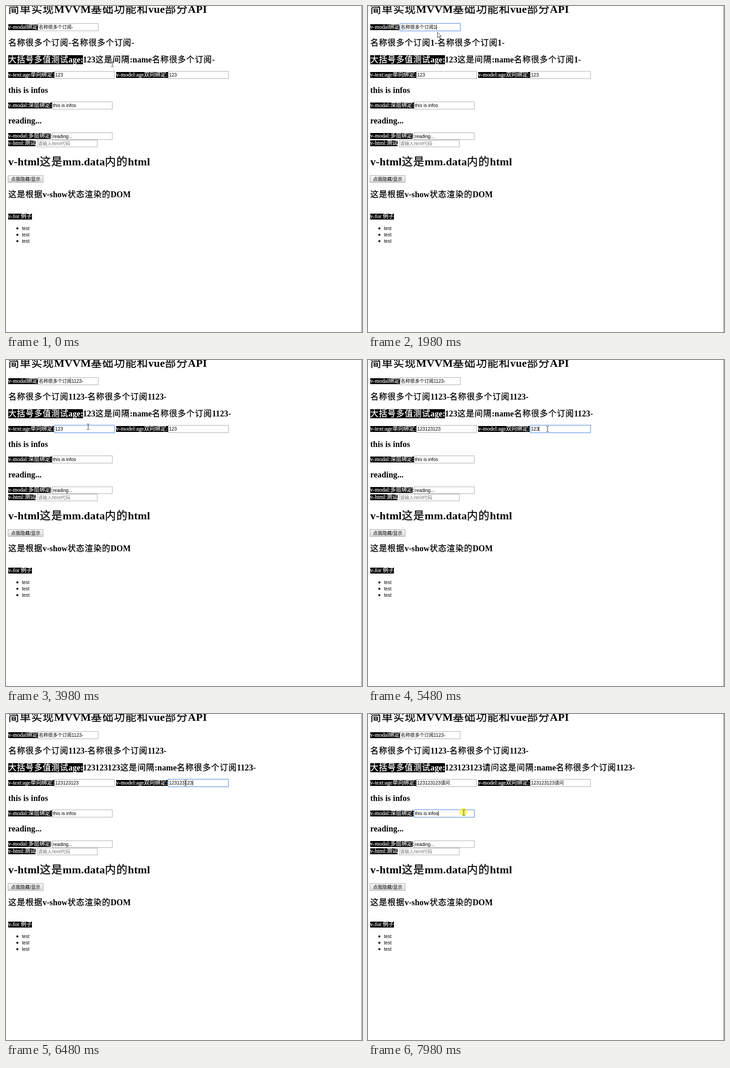
An HTML page that plays this animation: 782x716 px, repeating every 8000 ms.

```html
<!DOCTYPE html>
<html lang="zh-CN">
<head>
<meta charset="utf-8">
<style>
html, body { margin: 0; width: 100%; height: 100%; overflow: hidden; background: #fff; }
svg { display: block; }
text { white-space: pre; }
.h1, .h2 { font: bold 18px "Liberation Serif", serif; letter-spacing: .1px; }
.h1 { font-size: 24px; letter-spacing: .2px; }
.label { font: 12.2px "Liberation Serif", serif; stroke: currentColor; stroke-width: .2px; }
.ui { font: 10.3px "Liberation Sans", sans-serif; }
.ime { font: 13.3px "Noto Sans CJK SC", sans-serif; }
.num { font: 9.5px "Open Sans", sans-serif; }
.cjk { font-family: "Noto Sans CJK SC", sans-serif; font-weight: 400; }
.h1 .cjk, .h2 .cjk { letter-spacing: .05em; stroke: currentColor; stroke-width: .3px; }
.under { text-decoration: underline; }
</style>
</head>
<body>
<svg id="stage" width="782" height="716" viewBox="0 0 782 716"></svg>
<script>
const stage = document.getElementById('stage');

const start = {
  name: '', age: '123', oneWay: '123', twoWay: '123', compose: '',
  focus: '', caret: false, pointer: ['beam', 233, 127], click: false, ime: false
};

// Each step changes part of the state at its time in ms.
const steps = [
  [0, {}],
  [500, { pointer: ['beam', 146, 50] }],
  [980, { focus: 'name', caret: true }],
  [1480, { caret: false, pointer: ['arrow', 148, 61] }],
  [1980, { name: '1', caret: true, pointer: ['arrow', 152, 57] }],
  [2480, { name: '112' }],
  [2980, { name: '1123', pointer: ['beam', 213, 127] }],
  [3480, { focus: 'oneWay', pointer: ['beam', 180, 146], click: true }],
  [3980, { caret: false, click: false }],
  [4480, { oneWay: '1231231', caret: true }],
  [4980, { oneWay: '123123123', pointer: ['beam', 370, 151] }],
  [5480, { focus: 'twoWay', pointer: ['beam', 394, 151] }],
  [5980, { age: '123123', oneWay: '123123', twoWay: '123123' }],
  [6480, { age: '123123123', oneWay: '123123123', twoWay: '123123123' }],
  [6980, { age: "123123123q'we", oneWay: "123123123q'we", compose: "q'we", ime: true }],
  [7480, { age: '123123123请问', oneWay: '123123123请问', twoWay: '123123123请问',
           compose: '', ime: false, pointer: ['arrow', 230, 197] }],
  [7980, { focus: 'info', pointer: ['beam', 210, 216], click: true }]
];
let last = start;
const states = steps.map(([time, patch]) => ({ time, state: last = { ...last, ...patch } }));

const mark = s => s.replace(/[\u4e00-\u9fff]+/g, '<tspan class="cjk">$&</tspan>');
const rect = (x, y, w, h, fill, extra = '') =>
  `<rect x="${x}" y="${y}" width="${w}" height="${h}" fill="${fill}" ${extra}/>`;
const text = (x, y, s, cls, color = '#000', id = '') =>
  `<text x="${x}" y="${y}" class="${cls}" fill="${color}" color="${color}" id="${id}">${mark(s)}</text>`;
const label = (x, y, w, s) => rect(x, y, w, 13, '#000') + text(x, y + 10, s, 'label', '#fff');

function input(x, y, s, focused, { h = 17, color, compose = '' } = {}) {
  const ring = focused ? rect(x - .5, y - .5, 134, h + 1, 'none', 'stroke="#c3d7f6" rx="1"') : '';
  const border = rect(x + .5, y + .5, 132, h - 1, '#fff', `stroke="${focused ? '#6f9de8' : '#a9a9a9'}"`);
  const tail = compose && `<tspan class="under">${compose}</tspan>`;
  return ring + border + text(x + 2, y + 12, s + tail, 'ui', color, focused ? 'active' : '');
}

function candidates() {
  const words = ['请问', '权威', '全文', '气温', '趣味', '气味', ''];
  return rect(406.5, 160.5, 380, 32, '#fff', 'stroke="#0078d7"') + rect(406, 160, 60, 33, '#0078d7') +
    words.map((word, i) => {
      const x = 419 + 59 * i;
      return text(x, 182, `${i + 1}`, 'num', i ? '#777' : '#fff') +
        text(x + 8, 182, word, 'ime', i ? '#000' : '#fff');
    }).join('');
}

function pointer([kind, x, y], click) {
  const halo = click ? `<circle cx="${x - 1}" cy="${y - 1}" r="9" fill="#ffff30" opacity=".7"/>` : '';
  const shape = kind === 'beam'
    ? '<path d="M-2.5-5.5H-.5L.5-4.5L1.5-5.5H3.5M.5-4.5V5.5M-2.5 6.5H-.5L.5 5.5L1.5 6.5H3.5" fill="none" stroke="#222"/>'
    : '<path d="M.5.5V12.5L3.3 10L5.3 14.3L7.2 13.4L5.2 9.2H9Z" fill="#fff" stroke="#222" stroke-width=".9"/>';
  return `${halo}<g transform="translate(${x} ${y})">${shape}</g>`;
}

function draw(s) {
  const name = `名称很多个订阅${s.name}-`;
  const on = field => s.focus === field;
  stage.innerHTML = `<linearGradient id="face" x2="0" y2="1">
      <stop stop-color="#f8f8f8"/><stop offset="1" stop-color="#dcdcdc"/></linearGradient>` + [
    rect(781, 0, 1, 716, '#707070'),
    text(5, 15, '简单实现MVVM基础功能和vue部分API', 'h1'),
    label(5, 40, 65, 'v-modal绑定'),
    input(70, 38, name, on('name')),
    text(5, 87, name + name, 'h2'),
    rect(5, 108, 164, 20, '#000'),
    text(5, 124, '大括号多值测试age:', 'h2', '#fff'),
    text(169, 124, `${s.age}这是间隔:name${name}`, 'h2'),
    label(5, 145, 101, 'v-text:age单向绑定:'),
    input(106, 143, s.oneWay, on('oneWay')),
    label(242, 145, 114, 'v-model:age双向绑定:'),
    input(356, 143, s.twoWay, on('twoWay'), { compose: s.compose }),
    text(5, 191, 'this is infos', 'h2'),
    label(5, 212, 96, 'v-modal:深层绑定:'),
    input(101, 210, 'this is infos', on('info')),
    text(5, 258, 'reading...', 'h2'),
    label(5, 279, 93, 'v-modal:多层绑定'),
    text(98, 289, ':', 'label'),
    input(101, 278, 'reading...', false, { h: 16 }),
    label(5, 295, 60, 'v-html:测试'),
    input(68, 294, '请输入html代码', false, { h: 16, color: '#757575' }),
    text(5, 350, 'v-html这是mm.data内的html', 'h1'),
    rect(4.5, 372.5, 77, 15, 'url(#face)', 'stroke="#a3a3a3"'),
    text(11, 384, '点我隐藏/显示', 'ui'),
    text(5, 420, '这是根据v-show状态渲染的DOM', 'h2'),
    label(5, 456, 52, 'v-for 例子'),
    ...[492, 506, 520].map(y => `<circle cx="25" cy="${y - 3.5}" r="2.3"/>` + text(35, y, 'test', 'ui')),
    s.ime ? candidates() : ''
  ].join('');

  const active = document.getElementById('active');
  if (active && s.caret) {
    const index = active.getNumberOfChars() - (on('name') ? 2 : 1);
    const { x, y } = active.getEndPositionOfChar(index);
    stage.innerHTML += rect(Math.round(x), y - 9, 1, 11, '#000');
  }
  stage.innerHTML += pointer(s.pointer, s.click);
}

let shown;
function tick(now) {
  const time = now % 8000;
  const { state } = states.findLast(step => step.time <= time);
  if (state !== shown) draw(shown = state);
  requestAnimationFrame(tick);
}
tick(performance.now());
</script>
</body>
</html>
```
